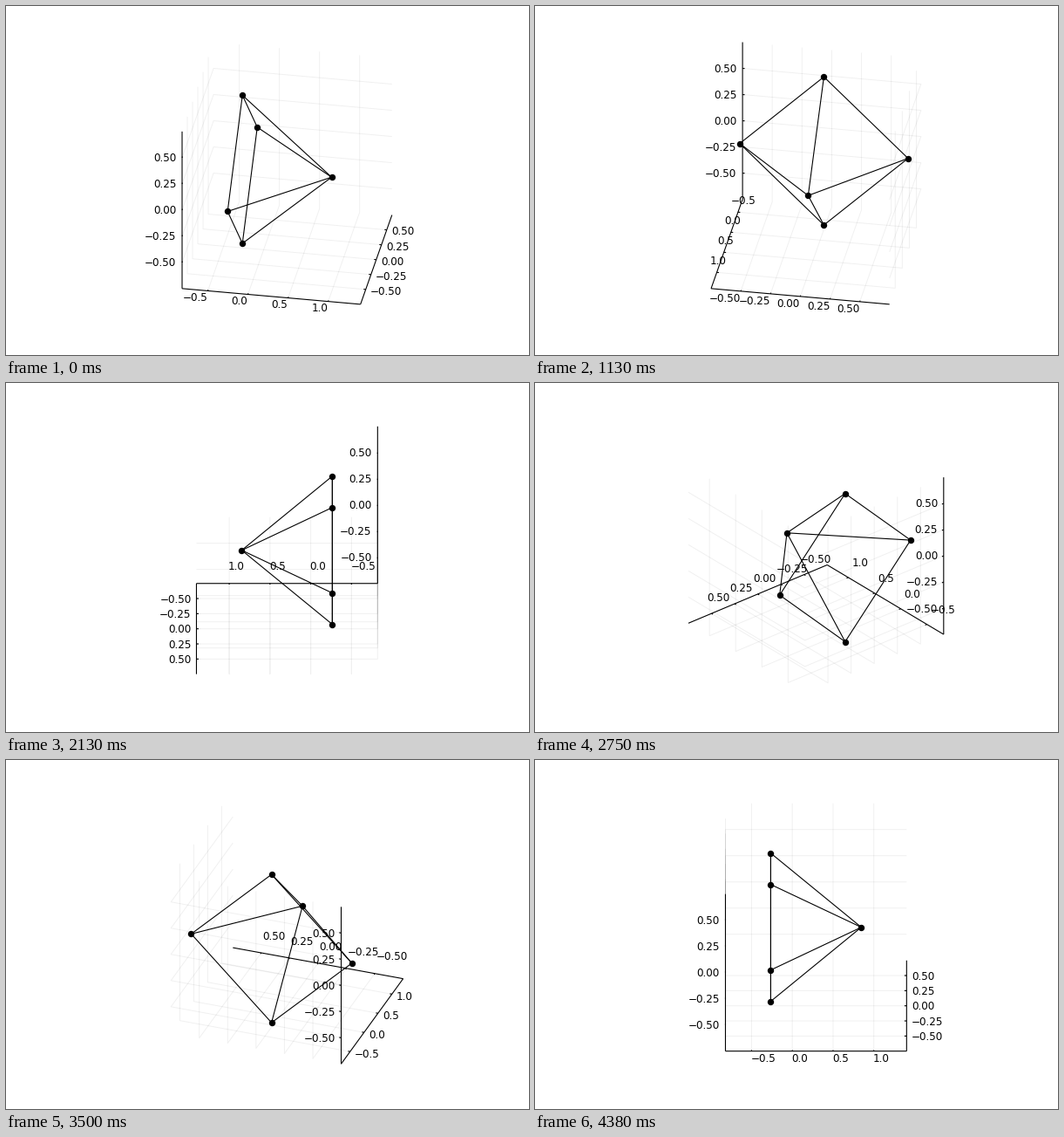
Recreate the animation shown at these times as a matplotlib script. Size 600 by 400 pixels, loop 4510 ms.

```python
import numpy as np
import matplotlib.pyplot as plt
from matplotlib.animation import FuncAnimation
from matplotlib.collections import LineCollection

W, H, DPI = 600, 400, 100
PX = 72 / DPI                      # one pixel in points
TICK_MS, LOOP_MS = 22, 4510
POSE_MS, POSES = 125, 36           # the camera turns in hard steps of 10 degrees

CENTER = np.array([322.4, 191.7])
HALF = 103.92                      # half edge of the axis cube, in pixels
ELEV = np.radians(30)
X_MID, X_SCALE = 0.291, 93.5
YZ_SCALE = HALF / 0.7495
LABEL_GAP = 6.7
FONT_PX = 12
DIGIT_HALF = 0.729 * FONT_PX / 2
TICK = 0.024 * HALF

X_TICKS = [-0.5, 0.0, 0.5, 1.0]
YZ_TICKS = [-0.5, -0.25, 0.0, 0.25, 0.5]


def project(points, az):
    """Orthographic view of cube coordinates, as stage pixels (y down)."""
    x, y, z = np.moveaxis(np.asarray(points, float), -1, 0)
    u = x * np.cos(az) + y * np.sin(az)
    depth = -x * np.sin(az) + y * np.cos(az)
    v = z * np.cos(ELEV) + depth * np.sin(ELEV)
    return np.stack([CENTER[0] + u, CENTER[1] - v], axis=-1)


def tick_text(value, digits):
    return f"{value:.{digits}f}".replace("-", "\u2212")


# Pyramid: a square standing in the y-z plane and an apex on the x axis
R = YZ_SCALE * np.sqrt(0.5)
BASE_X = -HALF / 2
VERTICES = np.array([(BASE_X, 0, R), (BASE_X, R, 0), (BASE_X, 0, -R),
                     (BASE_X, -R, 0), (HALF / 2, 0, 0)])
EDGES = [(i, (i + 1) % 4) for i in range(4)] + [(i, 4) for i in range(4)]

# Axis lines, inner tick marks, grid lines and label anchors in cube space
a = HALF
axis_lines = [[(-a, -a, -a), (a, -a, -a)],
              [(a, -a, -a), (a, a, -a)],
              [(-a, -a, -a), (-a, -a, a)]]
tick_lines, grid_lines, anchors = [], [], []
for value in X_TICKS:
    t = (value - X_MID) * X_SCALE
    tick_lines.append([(t, -a, -a), (t, -a + TICK, -a)])
    grid_lines.append([(t, -a, -a), (t, a, -a), (t, a, a)])
    anchors.append(("x", tick_text(value, 1), (t, -a, -a)))
for value in YZ_TICKS:
    t = value * YZ_SCALE
    tick_lines.append([(a, t, -a), (a - TICK, t, -a)])
    grid_lines.append([(a, t, -a), (-a, t, -a), (-a, t, a)])
    anchors.append(("y", tick_text(value, 2), (a, t, -a)))
    tick_lines.append([(-a, -a, t), (-a, -a + TICK, t)])
    grid_lines.append([(-a, -a, t), (-a, a, t), (a, a, t)])
    anchors.append(("z", tick_text(value, 2), (-a, -a, t)))
frame_lines = axis_lines + tick_lines

fig = plt.figure(figsize=(W / DPI, H / DPI), dpi=DPI, facecolor="white")
ax = fig.add_axes([0, 0, 1, 1])
ax.set(xlim=(0, W), ylim=(H, 0))
ax.axis("off")


def add_lines(width, alpha, zorder):
    lines = LineCollection([], colors=[(0, 0, 0, alpha)],
                           linewidths=width * PX, zorder=zorder)
    lines.set_snap(False)
    return ax.add_collection(lines, autolim=False)


grid = add_lines(1, 0.06, 1)
frame = add_lines(1.1, 1, 2)
edges = add_lines(1.1, 1, 4)
dots, = ax.plot([], [], "o", color="black", ms=7.4 * PX, mew=0,
                zorder=5, snap=False)
labels = [ax.text(0, 0, text, family="DejaVu Sans", size=FONT_PX * PX,
                  va="baseline", color="black", zorder=3)
          for _, text, _ in anchors]


def label_offset(letter, degrees):
    """Shift of a tick label from its tick, and its alignment."""
    if letter == "z":
        return -LABEL_GAP, 0, "right"
    turn = (degrees - (90 if letter == "y" else 0)) % 360
    s, c = np.sin(np.radians(turn)), np.cos(np.radians(turn))
    ha = "right" if 0 < turn <= 90 else "left"
    dx = -LABEL_GAP * s + (0.8 if ha == "right" else -1.1)
    dy = 7.4 * c + (0.2 if c > -1e-9 else -12.7)
    return dx, dy, ha


def update(i):
    # The pose reached by the end of this tick
    pose = min(((i + 1) * TICK_MS - 1) // POSE_MS, POSES - 1)
    degrees = 10 * (pose + 1)
    az = np.radians(degrees)
    grid.set_segments(list(project(grid_lines, az)))
    frame.set_segments(list(project(frame_lines, az)))
    corners = project(VERTICES, az)
    edges.set_segments([corners[list(pair)] for pair in EDGES])
    dots.set_data(corners[:, 0], corners[:, 1])
    for label, (letter, _, point) in zip(labels, anchors):
        x, y = project(point, az)
        dx, dy, ha = label_offset(letter, degrees)
        label.set_position((x + dx, y + dy + DIGIT_HALF))
        label.set_ha(ha)
    return [grid, frame, edges, dots, *labels]


anim = FuncAnimation(fig, update, frames=LOOP_MS // TICK_MS, interval=TICK_MS,
                     repeat=True, repeat_delay=0, blit=False)
plt.show()
```
